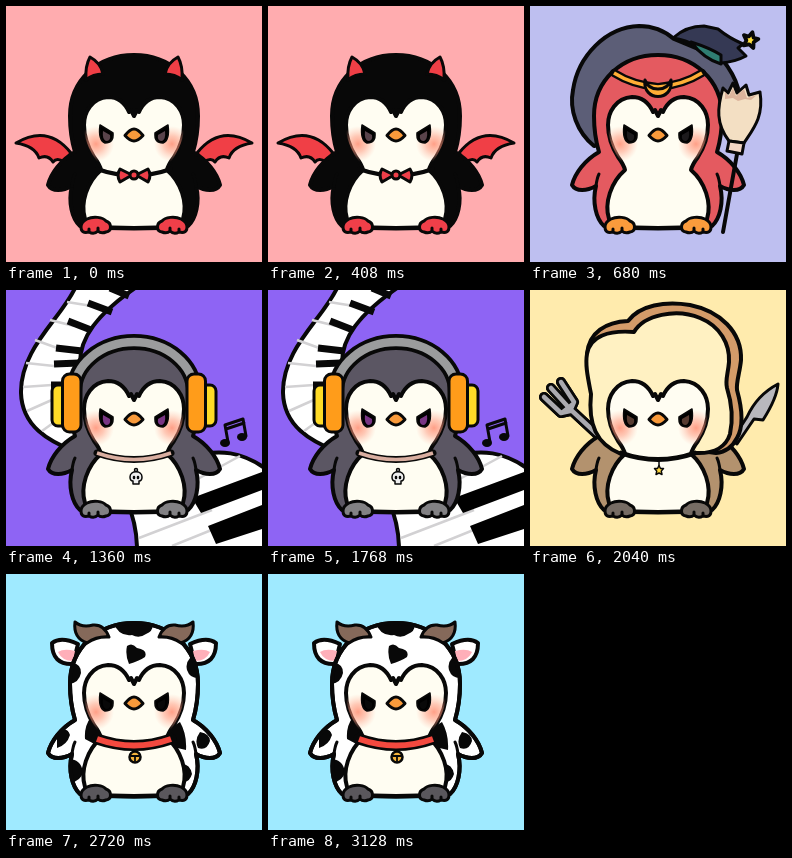
Write an HTML page that moves like this. It is 256 px wide and 256 px high and loops after 3.4 s.

```html
<!DOCTYPE html>
<html lang="en">
<head>
<meta charset="utf-8">
<title>Penguin costumes</title>
<style>
  html, body { margin: 0; width: 100%; height: 100%; overflow: hidden; }
  svg { display: block; width: 100vw; height: 100vh; }
  .ink { stroke: #080808; stroke-width: 4; stroke-linejoin: round; stroke-linecap: round; }
  .thin { stroke-width: 3; }
  .line { fill: none; }
  .coat { fill: var(--coat); }
  .foot { fill: var(--feet); }
  .iris { fill: var(--iris); }
  .scene + .scene { display: none; }
</style>
</head>
<body>
<svg viewBox="0 0 256 256">
  <defs>
    <radialGradient id="blush">
      <stop offset="0" stop-color="#ff8063" stop-opacity=".75"/>
      <stop offset=".45" stop-color="#ff9479" stop-opacity=".5"/>
      <stop offset="1" stop-color="#ffb09a" stop-opacity="0"/>
    </radialGradient>
    <path id="outline" d="M128 49C164 49 192 74 192 110C192 125 190 136 187 146C201 154 211 167 214 179C210 186 199 185 190 180C194 196 190 213 182 220Q128 225 74 220C66 213 62 196 66 180C57 185 46 186 42 179C45 167 55 154 69 146C66 136 64 125 64 110C64 74 92 49 128 49Z"/>
    <path id="front" d="M128 110L125 104L123 106C119 97 112 91 102 91C86 92 78 106 78 119C78 133 83 143 88 151Q94 159 95 164C81 176 74 197 79 213L84 220Q128 224 172 220L177 213C182 197 175 176 161 164Q162 159 168 151C173 143 178 133 178 119C178 106 170 92 154 91C144 91 137 97 133 106L131 104Z"/>
    <clipPath id="inBody"><use href="#outline"/></clipPath>
    <clipPath id="inFront"><use href="#front"/></clipPath>

    <g id="body">
      <use href="#outline" class="ink coat"/>
      <path id="armpit" class="ink thin line" d="M66 180Q67 172 69 168"/>
      <use href="#armpit" transform="matrix(-1 0 0 1 256 0)"/>
    </g>

    <g id="half">
      <circle cx="90" cy="138" r="18" fill="url(#blush)" clip-path="url(#inFront)"/>
      <path d="M94 119L107 127Q108 137 99 137Q92 134 94 119Z" class="ink" style="stroke-width:1.5"/>
      <path class="iris" d="M97 125L104 129Q105 135 100 135Q96 133 97 125Z"/>
      <path class="ink foot thin" d="M81 213C87 210 97 211 100 215C106 217 106 225 100 226Q95 228 92 225Q88 229 83 226Q75 228 75 221Q75 216 81 213ZM83 226V223M92 225V222"/>
    </g>
    <g id="face">
      <use href="#front" class="ink" fill="#fffdf2"/>
      <use href="#half"/>
      <use href="#half" transform="matrix(-1 0 0 1 256 0)"/>
      <path class="ink thin" fill="#f99a3b" d="M119 129.5Q124 123 128 123Q132 123 137 129.5Q132 135 128 135Q124 135 119 129.5Z"/>
    </g>
    <path id="collar" class="line" d="M91 163Q128 176 165 163"/>
    <path id="star" d="M0 -6L2 -2L6 -2L3 1.5L4 6L0 4L-4 6L-3 1.5L-6 -2L-2 -2Z"/>
  </defs>

  <!-- Devil -->
  <g class="scene" style="--coat:#080808;--feet:#ef3f49;--iris:#59434b">
    <path fill="#ffacaf" d="M0 0H256V256H0Z"/>
    <g id="wing">
      <path class="ink thin" fill="#f03f46" d="M10 137Q42 118 65 147L58 156Q51 151 47 156Q42 148 33 152Q29 140 10 137Z"/>
    </g>
    <use href="#wing" transform="matrix(-1 0 0 1 256 0)"/>
    <use href="#body"/>
    <path id="horn" class="ink thin" fill="#f03f46" d="M80 74Q79 60 84 51Q95 57 97 68Q87 68 80 74Z"/>
    <use href="#horn" transform="matrix(-1 0 0 1 256 0)"/>
    <use href="#face"/>
    <use href="#collar" class="ink"/>
    <g class="ink thin" fill="#ef3f49">
      <path d="M126 169L114 163Q110 169 114 176ZM130 169L142 163Q146 169 142 176Z"/>
      <circle cx="128" cy="169" r="4"/>
    </g>
  </g>

  <!-- Witch -->
  <g class="scene" style="--coat:#e45a60;--feet:#fa9b3c;--iris:#1c1a1c">
    <path fill="#bebff0" d="M0 0H256V256H0Z"/>
    <path class="ink" fill="#5c5e77" d="M64 140C47 126 39 104 43 84C48 50 76 21 109 20C124 20 136 26 144 33L192 53Q204 68 208 82Q206 91 189 94Z"/>
    <path class="ink thin" fill="#353954" d="M143 32Q156 20 174 20L188 23Q199 32 213 38L208 42L216 50Q205 56 191 57Q168 36 143 32Z"/>
    <path class="ink thin" fill="#2f7d72" d="M161 36Q180 42 191 49V58Q174 53 161 36Z"/>
    <use href="#star" class="ink thin" fill="#ffdf3e" transform="translate(220.5 33.5) rotate(15) scale(1.25)"/>
    <use href="#body"/>
    <path class="ink line" style="stroke-width:8" d="M84 67Q103 79 128 81Q153 79 172 67"/>
    <path stroke="#ffae35" stroke-width="3.5" fill="none" d="M84 67Q103 79 128 81Q153 79 172 67"/>
    <path class="ink thin" fill="#ffae35" d="M115 74C112 96 144 96 141 74Q138 83 128 83Q118 83 115 74Z"/>
    <use href="#face"/>
    <path class="ink line" d="M207 148L193 226"/>
    <path class="ink thin" fill="#f3dfc3" d="M193 82L198 87L203 77L207 87L216 79L219 89L230 86C234 111 223 123 214 137L199 135C186 118 187 102 193 82Z"/>
    <path fill="#dcb49c" d="M195 86L199 90L203 82L206 90L214 83L217 92L227 89L221 94L215 93L208 95L203 92L195 93Z"/>
    <path class="ink thin" fill="#f3d6c4" d="M199 135L214 137L212 148L197 145Z"/>
  </g>

  <!-- Musician -->
  <g class="scene" style="--coat:#5b5663;--feet:#828184;--iris:#793584">
    <path fill="#8e64f4" d="M0 0H256V256H0Z"/>
    <g class="ink" fill="#fff">
      <path d="M70 -4C57 27 14 58 15 103C16 136 42 151 70 162L100 150L74 75C73 48 91 24 132 -4Z"/>
      <path d="M121 212Q131 234 131 260H260V179C238 163 212 157 186 168Z"/>
    </g>
    <path stroke="#d2d1d3" stroke-width="2.5" fill="none" d="M61 12L86 16M44 30L68 36M29 50L54 59M20 73L48 76M17 97L46 95M21 121L48 109M36 141L54 128M133 248L206 220M166 256L208 239M188 191L234 166"/>
    <path stroke="#080808" stroke-width="7" d="M104 -2L123 6M82 13L106 22M62 31L85 40M50 58L76 61M48 74L73 73M45 95H60"/>
    <path d="M186 208L256 182V200L195 223ZM202 236L256 215V239L210 254Z"/>
    <use href="#body"/>
    <path class="ink line" style="stroke-width:16" d="M68 102A60 50 0 0 1 188 102"/>
    <path stroke="#9b9c9d" stroke-width="8.5" fill="none" d="M68 102A60 50 0 0 1 188 102"/>
    <g id="cup" class="ink thin">
      <rect x="46" y="95" width="16" height="41" rx="6" fill="#ffdb27"/>
      <rect x="56.500" y="84" width="18.500" height="58" rx="7" fill="#ff9c1a"/>
    </g>
    <use href="#cup" transform="matrix(-1 0 0 1 256 0)"/>
    <use href="#face"/>
    <use href="#collar" class="ink" style="stroke-width:7"/>
    <use href="#collar" stroke="#d9aea0" stroke-width="3.5"/>
    <g class="ink" style="stroke-width:1.5" fill="#eee">
      <circle cx="130" cy="180" r="1.5"/>
      <path d="M124 187C124 180 136 180 136 187Q136 191 133 191V194H127V191Q124 191 124 187Z"/>
      <path style="stroke-width:2.5" d="M128 187V188M132 187V188"/>
    </g>
    <path class="ink thin line" d="M222 152L219 135L237 129L240 146M220 139L238 133"/>
    <g fill="#080808">
      <ellipse cx="219" cy="153" rx="5" ry="4"/>
      <ellipse cx="236" cy="147" rx="5" ry="4"/>
    </g>
  </g>

  <!-- Toast -->
  <g class="scene" style="--coat:#b3926e;--feet:#766c64;--iris:#573b31">
    <path fill="#ffebad" d="M0 0H256V256H0Z"/>
    <path id="fork" class="ink line" style="stroke-width:10" d="M14 107L31 123L40 121L44 112L31 92M21 98L40 119L68 145"/>
    <use href="#fork"/>
    <path fill="none" stroke="#aaa9af" stroke-width="4.500" stroke-linecap="round" stroke-linejoin="round" d="M14 107L31 123L40 121L44 112L31 92M21 98L40 119L68 145M33 122L43 114"/>
    <path class="ink thin" fill="#b9b8bd" d="M202 150L217 127Q227 105 248 94Q247 108 233 130L224 129L207 154Z"/>
    <use href="#body"/>
    <path class="ink" fill="#d39b69" d="M57 64C59 42 76 32 98 31C110 15 135 11 160 15C190 21 212 42 211 70C210 82 206 92 207 100C212 118 214 136 207 148C203 156 196 162 186 163L90 150Z"/>
    <path class="ink" fill="#fff1c2" d="M91 164C66 154 58 134 61 104C58 88 55 75 57 64C60 46 79 40 104 42C114 25 146 18 170 28C190 36 200 54 199 72C198 84 195 90 197 98C202 114 203 130 200 144C196 157 184 164 165 163Q128 174 91 164Z"/>
    <use href="#face"/>
    <use href="#collar" class="ink" style="stroke-width:5"/>
    <path class="ink" style="stroke-width:1.5" d="M129 170V177"/>
    <use href="#star" class="ink" style="stroke-width:2" fill="#ffd83f" transform="translate(129 180) scale(.75)"/>
  </g>

  <!-- Cow -->
  <g class="scene" style="--coat:#fff;--feet:#5a575c;--iris:#080808">
    <path fill="#9feaff" d="M0 0H256V256H0Z"/>
    <g id="ear">
      <path class="ink" fill="#fff" d="M72 70Q55 62 46 69Q46 91 67 90Z"/>
      <path fill="#ffafb9" d="M69 77Q58 74 52 78Q56 87 67 87Z"/>
    </g>
    <use href="#ear" transform="matrix(-1 0 0 1 256 0)"/>
    <use href="#body"/>
    <g clip-path="url(#inBody)" fill="#080808">
      <path d="M107 46H145Q150 56 140 60Q133 65 126 61Q111 63 107 46ZM121 72Q126 68 131 74Q142 76 139 83Q133 87 123 90Q119 81 121 72ZM62 90Q75 87 75 99Q73 109 63 110ZM194 78Q178 84 181 96Q184 105 194 104ZM51 158Q61 152 64 161Q61 171 51 174ZM85 143Q78 152 79 165L96 174V158ZM174 148Q159 155 163 172L180 176Q181 160 174 148ZM194 158Q204 160 204 167Q201 177 192 174Q188 166 194 158ZM62 185Q75 185 77 198Q75 207 64 209ZM176 190Q184 190 186 200Q183 210 175 207Z"/>
    </g>
    <use href="#outline" class="ink line"/>
    <path id="cowHorn" class="ink thin" fill="#85695a" d="M81 69Q67 64 69 48Q76 54 87 51Q98 50 103 63Q91 62 81 69Z"/>
    <use href="#cowHorn" transform="matrix(-1 0 0 1 256 0)"/>
    <use href="#face"/>
    <use href="#collar" class="ink" style="stroke-width:11" transform="translate(0 2)"/>
    <use href="#collar" stroke="#f4493f" stroke-width="6" transform="translate(0 2)"/>
    <circle class="ink" style="stroke-width:2.5" cx="129" cy="183" r="5.5" fill="#f4b23b"/>
    <path class="ink line" style="stroke-width:1.8" d="M125 182H133M129 183V187"/>
  </g>
</svg>
<script>
  const HOLD = 680;
  const scenes = [...document.querySelectorAll('.scene')];

  function draw(now) {
    const current = Math.floor(now / HOLD) % scenes.length;
    scenes.forEach((scene, i) => { scene.style.display = i === current ? 'inline' : 'none'; });
    requestAnimationFrame(draw);
  }
  draw(0);
</script>
</body>
</html>
```
